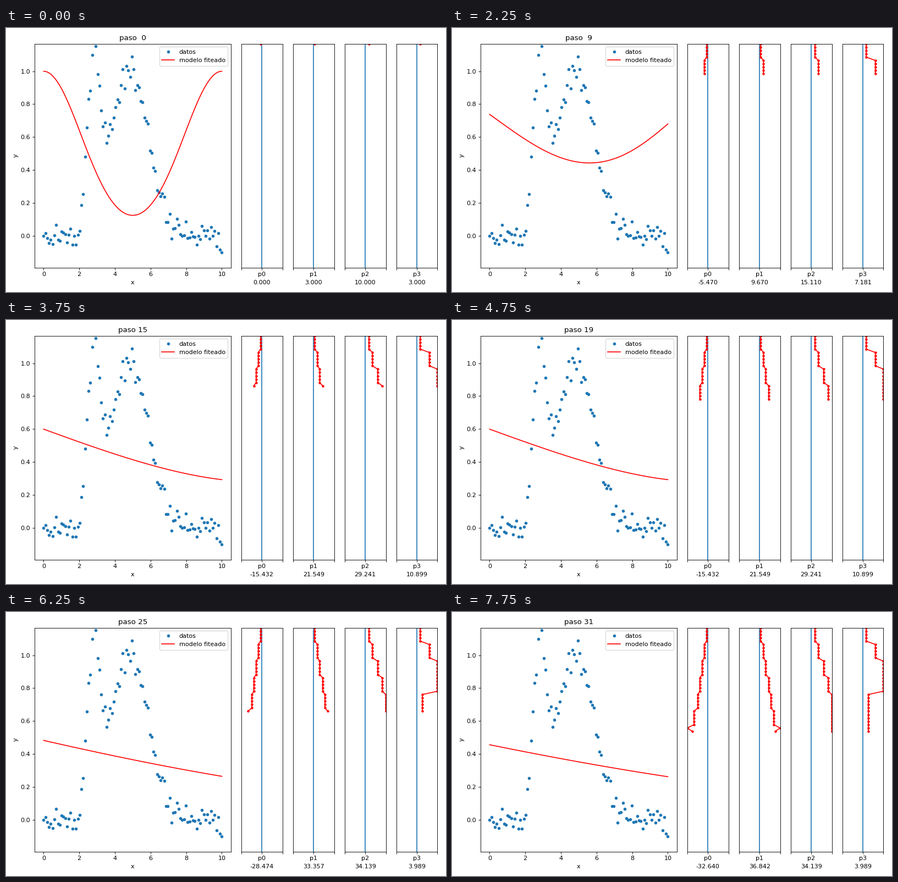
These frames come from a looping animation (800x480 px, 8 s). A matplotlib script:

```python
import numpy as np
import matplotlib.pyplot as plt
from matplotlib.animation import FuncAnimation

W, H, DPI = 800, 480, 80
FRAMES, INTERVAL = 32, 250
LEFT, STEP, COL = 52.15, 93.94, 74.72     # column grid, in pixels
BOTTOM, TOP = 44.35, 451.4

TRUE = np.array([2.8, 0.5, 4.8, 1.5])
NOISE = 0.05
GRADIENT_CALLS = 4
TOTAL_STEPS = 67

# Points accepted by the optimiser, then an overshoot and a shorter retry
ACCEPTED = [
    (0, 3, 10, 3),
    (-5.470, 9.670, 15.110, 7.181),
    (-10.247, 14.754, 22.538, 10.944),
    (-15.432, 21.549, 29.241, 10.899),
    (-19.924, 26.656, 34.139, 3.989),
    (-28.474, 33.357, 34.139, 3.989),
]
OVERSHOOT = (-43.4, 47.9, 34.139, 3.989)
RETRY = (-32.640, 36.842, 34.139, 3.989)


def bell(x, center, width):
    return np.exp(-((x - center) / width) ** 2)


def model(p):
    return bell(x, p[0], p[1]) + bell(x, p[2], p[3])


def add_axes(col, span=1):
    width = (span - 1) * STEP + COL
    return fig.add_axes([(LEFT + col * STEP) / W, BOTTOM / H,
                         width / W, (TOP - BOTTOM) / H])


x = np.linspace(0, 10, 100)
y = model(TRUE) + np.random.default_rng(7).normal(0, NOISE, x.size)

# Each accepted point stays put while the gradient is evaluated
path = np.vstack([np.repeat(ACCEPTED, GRADIENT_CALLS + 1, axis=0),
                  OVERSHOOT, RETRY])
error = path - TRUE
limits = np.abs(error).max(axis=0)

fig = plt.figure(figsize=(W / DPI, H / DPI), dpi=DPI)

main = add_axes(0, 4)
main.plot(x, y, "o", ms=4, label="datos")
curve, = main.plot(x, model(path[0]), "r-", label="modelo fiteado")
main.set_xlim(-0.5, 10.5)
main.set_ylim(-0.1931, 1.1671)
main.set_xlabel("x")
main.set_ylabel("y")
main.legend(loc="upper right")
title = main.set_title("")

panels, trails = [], []
for k, lim in enumerate(limits):
    ax = add_axes(4 + k)
    ax.axvline(0)
    trail, = ax.plot([], [], "r.-")
    ax.set_xlim(-lim, lim)
    ax.set_ylim(TOTAL_STEPS, 0)
    ax.set_xticks([-lim, 0, lim], ["", f"p{k}", ""])
    ax.set_yticks([])
    panels.append(ax)
    trails.append(trail)


def update(step):
    title.set_text(f"paso {step:2d}")
    curve.set_ydata(model(path[step]))
    for k, (ax, trail) in enumerate(zip(panels, trails)):
        trail.set_data(error[:step + 1, k], np.arange(step + 1))
        ax.set_xlabel(f"{path[step, k]:.3f}")
    return [title, curve, *trails]


anim = FuncAnimation(fig, update, frames=FRAMES, interval=INTERVAL,
                     init_func=lambda: update(0), repeat=True, repeat_delay=0)
plt.show()
```
